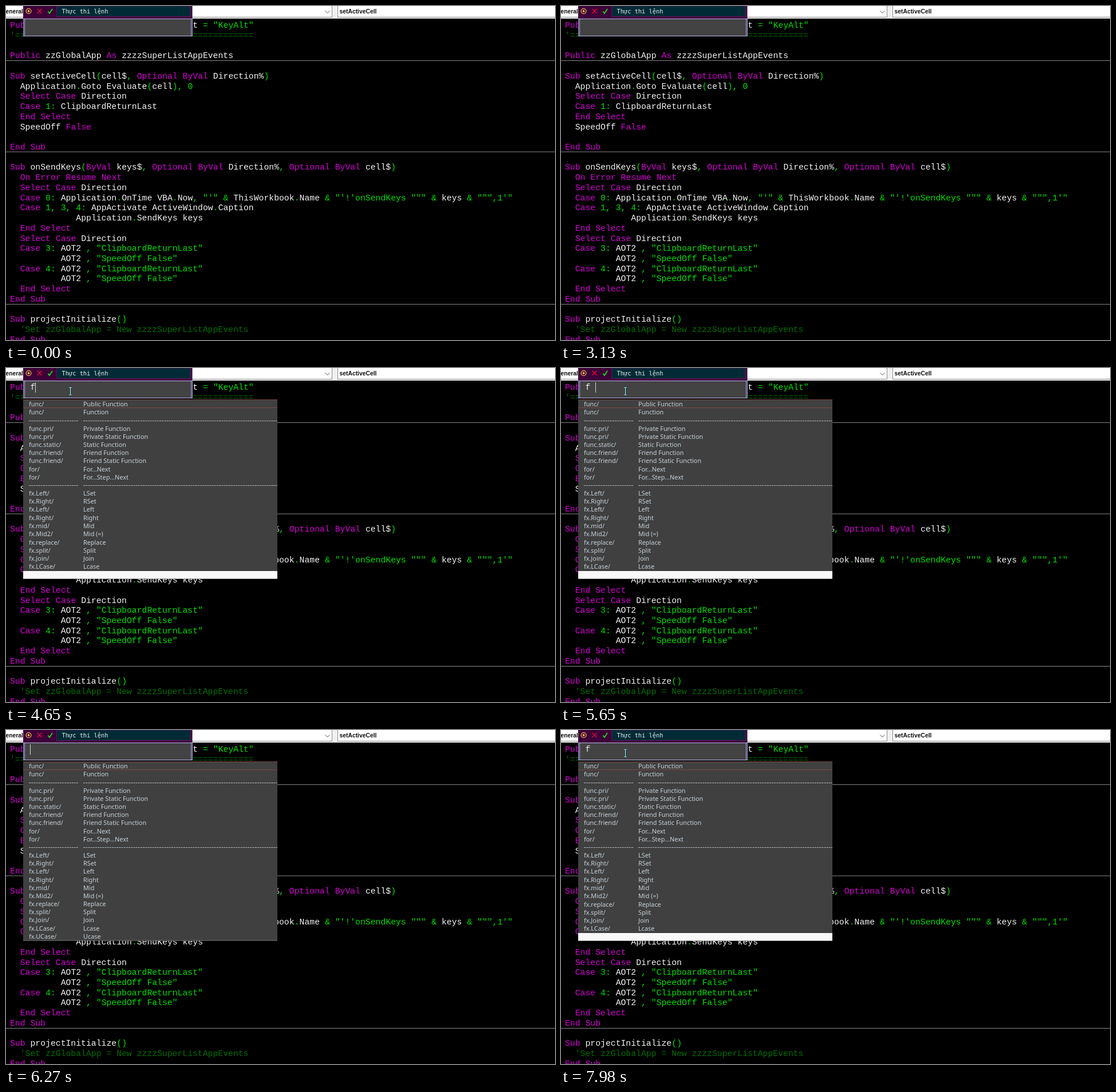
Animation of 959x584 px, one loop 8 s. Source, as an HTML page:

```html
<!DOCTYPE html>
<html lang="vi">
<head>
<meta charset="utf-8">
<title>Code editor with command box</title>
<style>
html, body { margin: 0; width: 100%; height: 100%; overflow: hidden; background: #000; }
svg { display: block; width: 959px; height: 584px; }
text { white-space: pre; }
.code { font: 14.78px "Liberation Mono", monospace; }
.head { font: bold 10.35px "Liberation Sans", sans-serif; fill: #111; }
.title { font: 10.35px "DejaVu Sans Mono", monospace; fill: #e8f0f0; }
.list { font: 10.85px "Noto Sans", "Open Sans", sans-serif; fill: #c6d2da; }
</style>
</head>
<body>
<svg id="stage" viewBox="0 0 959 584"></svg>
<script>
const NS = "http://www.w3.org/2000/svg";
const stage = document.getElementById("stage");

function add(tag, attrs, parent = stage, text) {
  const el = document.createElementNS(NS, tag);
  for (const k in attrs) el.setAttribute(k, attrs[k]);
  if (text !== undefined) el.textContent = text;
  parent.appendChild(el);
  return el;
}
const rect = (x, y, width, height, fill, parent, more) =>
  add("rect", { x, y, width, height, fill, ...more }, parent);
const path = (d, stroke, parent, more) =>
  add("path", { d, stroke, fill: "none", ...more }, parent);
const label = (x, y, cls, text, parent, more) =>
  add("text", { x, y, class: cls, ...more }, parent, text);

const PITCH = 8.87, LEAD = 17.73;
const KEYWORDS = new Set(("Public As Sub Optional ByVal Select Case End False " +
  "On Error Resume Next").split(" "));
const TOKEN = /'.*|"(?:[^"]|"")*"|[A-Za-z]\w*[$%]?|\s+|./g;

const CODE = `Public                              t = "KeyAlt"
'${"=".repeat(47)}

Public zzGlobalApp As zzzzSuperListAppEvents

Sub setActiveCell(cell$, Optional ByVal Direction%)
  Application.Goto Evaluate(cell), 0
  Select Case Direction
  Case 1: ClipboardReturnLast
  End Select
  SpeedOff False

End Sub

Sub onSendKeys(ByVal keys$, Optional ByVal Direction%, Optional ByVal cell$)
  On Error Resume Next
  Select Case Direction
  Case 0: Application.OnTime VBA.Now, "'" & ThisWorkbook.Name & "'!'onSendKeys """ & keys & """,1'"
  Case 1, 3, 4: AppActivate ActiveWindow.Caption
             Application.SendKeys keys
  End Select
  Select Case Direction
  Case 3: AOT2 , "ClipboardReturnLast"
          AOT2 , "SpeedOff False"
  Case 4: AOT2 , "ClipboardReturnLast"
          AOT2 , "SpeedOff False"
  End Select
End Sub

Sub projectInitialize()
  'Set zzGlobalApp = New zzzzSuperListAppEvents
End Sub`;

function colour(token) {
  if (token[0] === "'") return "#007000";
  if (KEYWORDS.has(token)) return "#d400d4";
  return /^[A-Za-z]/.test(token) ? "#f4f4f4" : "#00e000";
}

function drawCode() {
  CODE.split("\n").forEach((line, i) => {
    const row = label(7, 38.2 + i * LEAD, "code", "");
    let col = 0;
    for (const token of line.match(TOKEN) || []) {
      if (token.trim())
        add("tspan", { x: 7 + col * PITCH, fill: colour(token) }, row, token);
      col += token.length;
    }
  });
  for (const y of [95.5, 255, 521.5]) path(`M0 ${y}H959`, "#868686");
}

function drawHeader() {
  rect(0, 0, 959, 22, "#f0f0f0");
  rect(-2, -2, 571.5, 21.5, "#fff", stage, { stroke: "#8a8a8a" });
  rect(579.5, -2, 400, 21.5, "#fff", stage, { stroke: "#8a8a8a" });
  label(-0.5, 13, "head", "eneral)");
  label(582.5, 13, "head", "setActiveCell");
  path("M557.5 8.5l4 4 4-4", "#555");
}

function drawBox() {
  rect(30, 0, 295.5, 22, "#3d0038");
  rect(88.5, 0, 234, 18.5, "#002b36", stage, { stroke: "#65105c" });
  add("circle", { cx: 39.5, cy: 9, r: 4.4, fill: "none", stroke: "#f0b850", "stroke-width": 1.3 });
  add("circle", { cx: 39.5, cy: 9, r: 2, fill: "#f0b850" });
  path("M54.5 5l8 8M62.5 5l-8 8", "#e01038", stage, { "stroke-width": 1.3 });
  path("M73.5 9.5l2.5 3.5 5-8", "#20e020", stage, { "stroke-width": 1.7 });
  label(97.5, 13, "title", "Thực thi lệnh");
  rect(30.5, 22.5, 295, 30, "#1c1830", stage, { stroke: "#b9b0ee" });
  rect(32, 23, 292, 29, "#434343");
  path("M32.5 23V52M323.5 23V52", "#b9b0ee");
}

const ROWS = `func/|Public Function
func/|Function
-
func.pri/|Private Function
func.pri/|Private Static Function
func.static/|Static Function
func.friend/|Friend Function
func.friend/|Friend Static Function
for/|For...Next
for/|For...Step...Next
-
fx.Left/|LSet
fx.Right/|RSet
fx.Left/|Left
fx.Right/|Right
fx.mid/|Mid
fx.Mid2/|Mid (=)
fx.replace/|Replace
fx.split/|Split
fx.Join/|Join
fx.LCase/|Lcase
fx.UCase/|Ucase`.split("\n");

function drawList() {
  const g = add("g", {});
  rect(30, 55, 444, 313.5, "#404040", g);
  path("M30 368H474", "#6a6a6a", g);
  path("M30.5 55.5H474M30.5 69.5H474", "#b85050", g, { "stroke-dasharray": "1 1" });
  const tail = add("g", {}, g);
  let last;
  ROWS.forEach((row, i) => {
    const y = 67.3 + i * 14.16;
    if (row === "-") {
      const mid = Math.round(y - 4) + 0.5;
      path(`M40 ${mid}H126M135 ${mid}H474`, "#b4bcc2", g, { "stroke-dasharray": "3.1 1.06" });
      return;
    }
    last = add("g", {}, i < 17 ? g : tail);
    row.split("|").forEach((s, k) => label(k ? 135 : 40, y, "list", s, last));
  });
  const bar = rect(30, 355, 444, 13.5, "#f8f8f8", g);
  return { g, tail, last, bar };
}

drawCode();
drawHeader();
drawBox();
const list = drawList();
const typed = label(42.5, 38.2, "code", "", stage, { fill: "#ececec" });
const caret = rect(42, 25, 1, 18, "#d8d8d8");
const beam = add("g", {});
const beamShape = "M-2.5 -6.5H-.7L0 -6 .7 -6.5H2.5M0 -6V6M-2.5 6.5H-.7L0 6 .7 6.5H2.5";
path(beamShape, "#0a3038", beam, { "stroke-width": 3 });
path(beamShape, "#c4eef2", beam, { "stroke-width": 1.2 });

const LOOP = 8000, TICK = 100, BLINK = 505, START = 190;
// Steps of [time, value]; each key press restarts the caret blink.
const TEXT = [[START, ""], [3730, "fo"], [4630, "f"], [5550, "f "], [6270, ""], [7270, "f"]];
const LIST = [[0, ""], [3730, "blank"], [4230, "bar"], [6270, "full"], [6370, ""], [7370, "bar"]];
// The pointer flickers once per tick in runs of [time, ticks].
const FLICKER = [[START, 8], [1110, 4], [1710, 3], [2110, 4], [2630, 4], [3130, 4],
  [3630, 5], [4230, 11], [5450, 10], [6570, 4], [7170, 4], [7780, 3]];

const at = (track, t) => track.filter(([time]) => t >= time).pop() || track[0];
const show = (el, on) => el.setAttribute("visibility", on ? "inherit" : "hidden");

// A key press uses up its tick, so the pointer keeps its state there.
function beamOn(t) {
  let flips = 0;
  for (const [time, ticks] of FLICKER)
    if (t >= time) flips += Math.min(ticks, 1 + Math.floor((t - time) / TICK));
  const keys = TEXT.filter(([time]) => time > START && t >= time).length;
  return (flips - keys) % 2 === 1;
}

function beamPlace(t) {
  const p = Math.min(1, Math.max(0, Math.floor((t - START) / TICK) / 7));
  const rest = (1 - p) ** 2;
  return [112.5 + 303 * rest, 40.5 + 244 * rest];
}

function draw(t) {
  const [pressed, text] = at(TEXT, t);
  const mode = at(LIST, t)[1];
  typed.textContent = text;
  caret.setAttribute("x", Math.round(42 + text.length * PITCH));
  show(caret, !(Math.floor((t - pressed) / BLINK) & 1));
  show(beam, beamOn(t));
  beam.setAttribute("transform", `translate(${beamPlace(t)})`);
  show(list.g, mode);
  show(list.last, mode === "full");
  show(list.bar, mode === "bar");
  list.tail.setAttribute("transform", `translate(0 ${mode === "bar" ? 0.7 : 0})`);
}

const begin = performance.now();
function tick() {
  draw((performance.now() - begin) % LOOP);
  requestAnimationFrame(tick);
}
draw(0);
requestAnimationFrame(tick);
</script>
</body>
</html>
```
